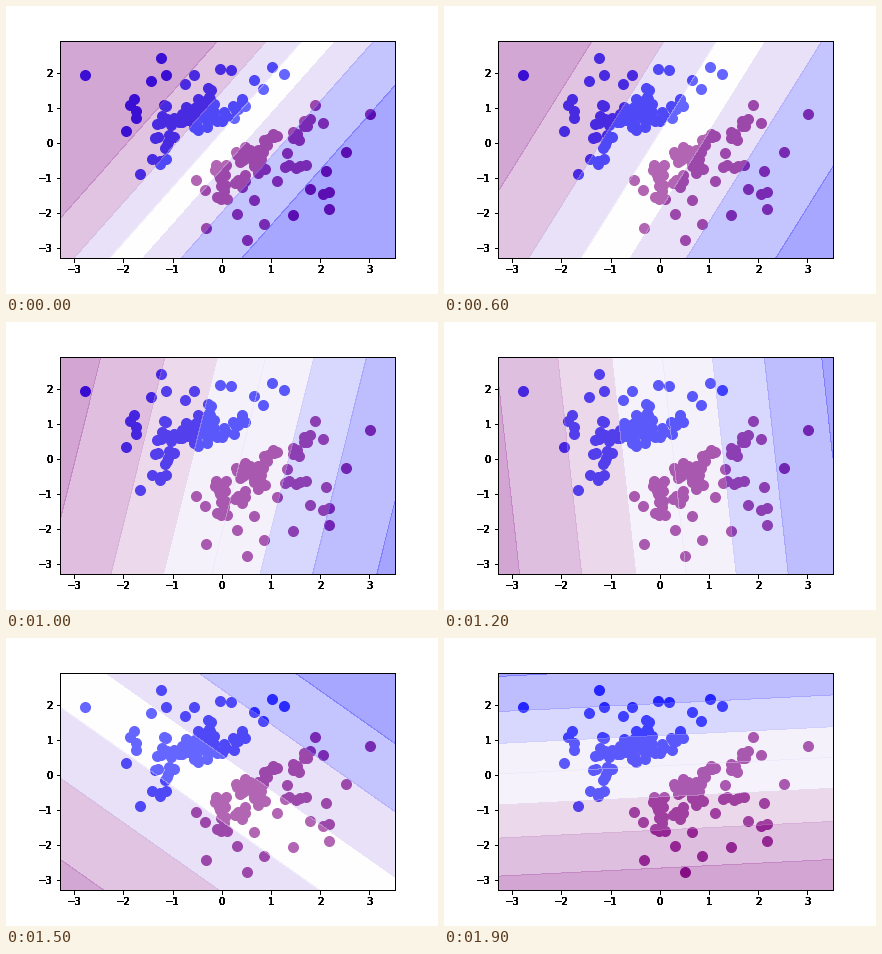
A matplotlib script for the animation above (2 s loop, 432 by 288 pixels).

```python
import numpy as np
import matplotlib.pyplot as plt
from matplotlib.animation import FuncAnimation
from matplotlib.colors import ListedColormap

FRAMES, INTERVAL = 20, 100
XLIM, YLIM = (-3.29, 3.52), (-3.28, 2.94)
BOX = (0.125, 0.125, 0.775, 0.755)
rng = np.random.default_rng(4)


def cloud(cx, cy, rx, ry, n, tilt=0):
    """n points spread evenly over an ellipse turned by tilt degrees."""
    r = np.sqrt((np.arange(n) + .5) / n)
    a = 2.4 * np.arange(n) + rng.uniform(-.6, .6, n)
    x, y = rx * r * np.cos(a), ry * r * np.sin(a)
    c, s = np.cos(np.radians(tilt)), np.sin(np.radians(tilt))
    return np.column_stack((cx + c * x - s * y, cy + s * x + c * y))


# each class: a few stray points plus the dense groups
upper = np.vstack([
    [(-2.79, 1.95), (-1.23, 2.45), (-1.43, 1.78), (-1.13, 1.95), (-.57, 1.95),
     (-.04, 2.12), (.18, 2.10), (1.03, 2.18), (1.27, 1.98), (.65, 1.81),
     (.83, 1.55), (-.75, 1.70), (-1.95, .35), (-1.66, -.88)],
    cloud(-.42, .85, .36, .50, 27),
    cloud(-.24, 1.48, .08, .18, 3),
    cloud(.20, .90, .50, .16, 11, 55),
    cloud(-1.08, .50, .32, .72, 18),
    cloud(-1.80, .95, .14, .36, 4),
    cloud(-1.34, -.50, .24, .12, 4),
])
lower = np.vstack([
    [(3.02, .83), (1.90, 1.11), (2.05, .58), (2.52, -.25), (2.12, -.79),
     (1.80, -1.30), (2.18, -1.39), (2.05, -1.46), (2.18, -1.89), (1.45, -2.05),
     (1.12, -1.09), (.85, -2.30), (.51, -2.77), (.65, -1.62), (.31, -2.03),
     (-.32, -2.43), (-.53, -1.06), (-.34, -1.33), (1.32, -.28)],
    cloud(1.62, .40, .42, .15, 8, 62),
    cloud(1.00, .15, .34, .08, 8, 52),
    cloud(.55, -.32, .32, .26, 16, 25),
    cloud(.76, -.66, .14, .32, 7),
    cloud(-.03, -.78, .16, .24, 9),
    cloud(0, -1.38, .14, .32, 6),
    cloud(.42, -1.08, .16, .22, 5),
    cloud(1.50, -.64, .28, .08, 5),
])


def tint(t):
    """Purple to white to blue, with one shared hue near the middle."""
    u = 2 * t - 1
    hue = (.25, 0, .75) if abs(u) < .33 else (0, 0, 1) if u > 0 else (.5, 0, .5)
    return 1 - abs(u) * (1 - np.array(hue))


def weights(n):
    """Logistic model after n training steps."""
    return (.891 - .0473 * n - .00005 * n * n,
            -.562 + .0489 * n,
            -.013 - .0205 * n + .00062 * n * n)


def make_axes():
    axes = fig.add_axes(BOX, xlim=XLIM, ylim=YLIM, facecolor="none")
    axes.set_xticks(range(-3, 4))
    axes.set_yticks(range(-3, 3))
    return axes


plt.rcParams.update({"font.family": "DejaVu Sans", "font.size": 10})
cmap = ListedColormap([tint(t) for t in np.linspace(0, 1, 256)])
fig = plt.figure(figsize=(6, 4), dpi=72, facecolor="white")
ax = make_axes()
for _ in range(9):  # stacked axes make labels and spines solid black
    make_axes()

for pts, color in ((upper, "blue"), (lower, "purple")):
    ax.scatter(*pts.T, s=100, c=color)

xx, yy = np.meshgrid(np.linspace(*XLIM, 240), np.linspace(*YLIM, 240))
shown = []


def draw(n):
    while shown:
        shown.pop().remove()
    wx, wy, b = weights(n)
    prob = 1 / (1 + np.exp(-(wx * xx + wy * yy + b)))
    shown.append(ax.contourf(xx, yy, prob, cmap=cmap, alpha=.4))
    ax.set(xlim=XLIM, ylim=YLIM)
    return shown


anim = FuncAnimation(fig, draw, frames=FRAMES, interval=INTERVAL,
                     init_func=lambda: draw(0), repeat=True, repeat_delay=0)
plt.show()
```
